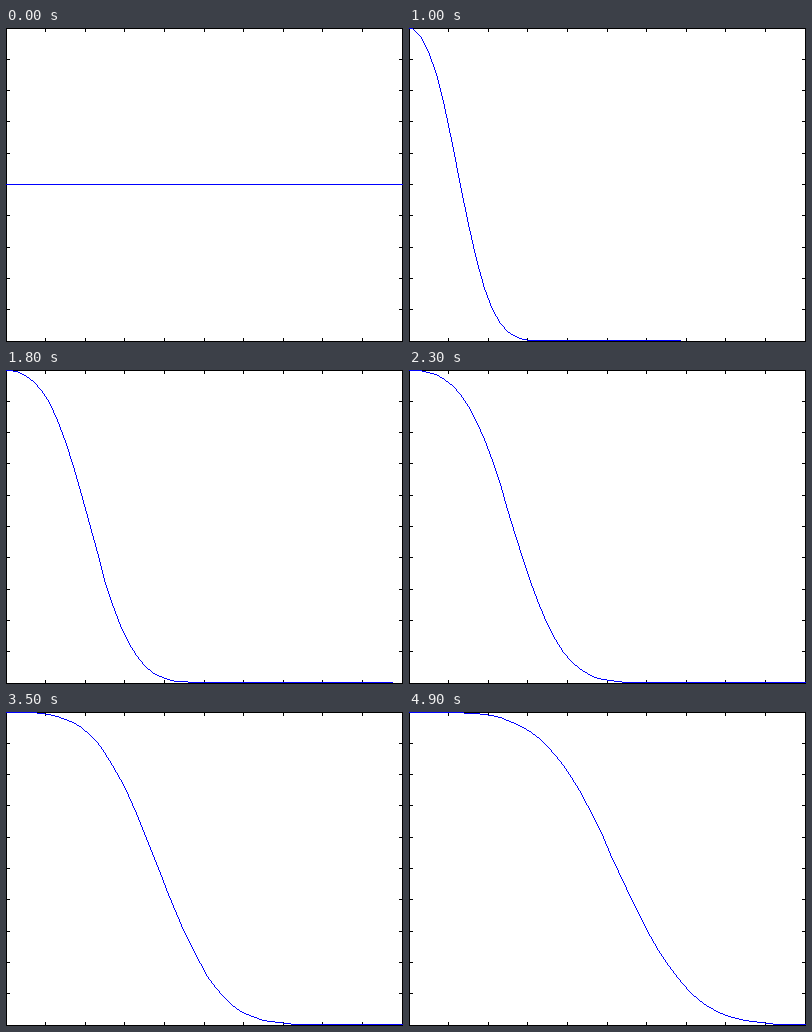
A matplotlib script for the animation above (5 s loop, 397 by 314 pixels).

```python
import math

import matplotlib.pyplot as plt
import numpy as np
from matplotlib.animation import FuncAnimation

WIDTH, HEIGHT, DPI = 397, 314, 100
FRAMES, INTERVAL = 50, 100
BLACK, BLUE = (0, 0, 0), (0, 0, 255)

# Advection-diffusion on a uniform grid, in pixels and frames
CELL = (WIDTH - 1) / 50
INLET = CELL / 2
SPEED = 4.0
DIFFUSION = 36.0


def concentration(distance, time):
    """Front entering a half-space whose inlet is held at 1."""
    spread = 2 * math.sqrt(DIFFUSION * time)
    direct = math.erfc((distance - SPEED * time) / spread)
    inlet = math.exp(SPEED * distance / DIFFUSION) * math.erfc(
        (distance + SPEED * time) / spread)
    return (direct + inlet) / 2


def make_axes_box():
    box = np.full((HEIGHT, WIDTH, 3), 255, np.uint8)
    box[[0, -1]] = BLACK
    box[:, [0, -1]] = BLACK
    for k in range(1, 10):
        col = int(k * (WIDTH - 1) / 10)
        row = int(k * (HEIGHT - 1) / 10)
        box[:4, col] = box[-4:, col] = BLACK
        box[row, :4] = box[row, -4:] = BLACK
    return box


def segment(start, end):
    """Pixels of a one-pixel line between two (column, row) points."""
    steps = max(abs(end[0] - start[0]), abs(end[1] - start[1]))
    points = np.linspace(start, end, steps + 1)
    return np.floor(points + 0.5).astype(int)


def curve_pixels(time):
    if time == 0:
        row = (HEIGHT - 1) // 2
        return segment((0, row), (WIDTH - 1, row))
    vertices = [(0, 0)]
    for j in range(51):
        value = concentration(j * CELL, time)
        row = int((HEIGHT - 1) * (1 - value))
        vertices.append((int(INLET + j * CELL), min(max(row, 0), HEIGHT - 2)))
    pixels = np.vstack([segment(a, b) for a, b in zip(vertices, vertices[1:])])
    # Past this column the value is numerically zero and hides in the border
    edge = min(4 + 68.3 * math.sqrt(time) + 5.13 * time, WIDTH - 1)
    return pixels[pixels[:, 0] <= edge]


AXES_BOX = make_axes_box()

fig = plt.figure(figsize=(WIDTH / DPI, HEIGHT / DPI), dpi=DPI)
ax = fig.add_axes([0, 0, 1, 1])
ax.axis("off")
image = ax.imshow(AXES_BOX, interpolation="nearest", aspect="auto")


def update(frame):
    canvas = AXES_BOX.copy()
    cols, rows = curve_pixels(frame).T
    canvas[rows, cols] = BLUE
    image.set_data(canvas)
    return (image,)


animation = FuncAnimation(fig, update, frames=FRAMES, interval=INTERVAL,
                          repeat=True, repeat_delay=0)
plt.show()
```
